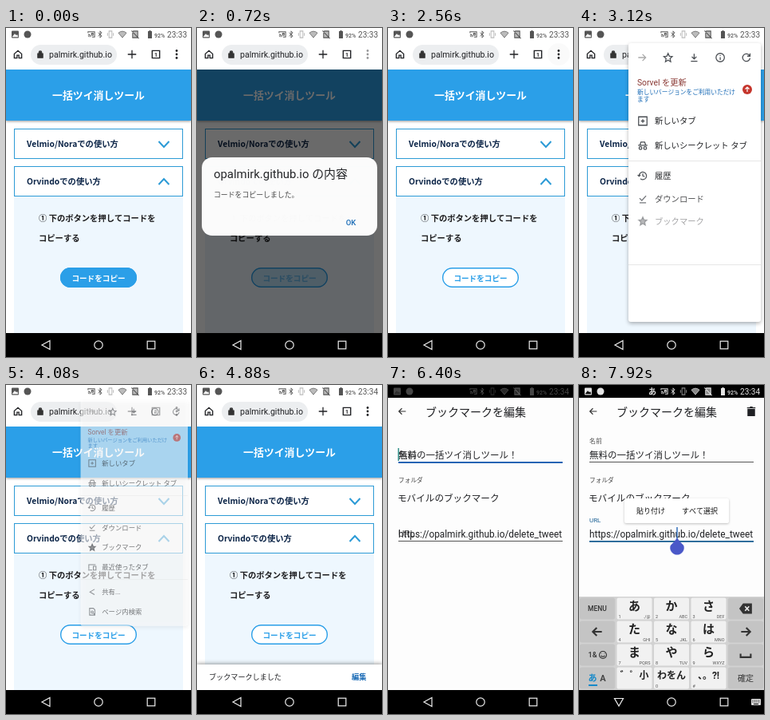
Animation of 232x412 px, one loop 8000 ms. Source, as an HTML page with a canvas:

```html
<!DOCTYPE html>
<html lang="ja">
<head>
<meta charset="utf-8">
<title>ブックマークの登録</title>
<style>
html, body { margin: 0; width: 232px; height: 412px; overflow: hidden; background: #fff; }
canvas { display: block; }
</style>
</head>
<body>
<canvas id="stage" width="232" height="412"></canvas>
<script>
const g = document.getElementById('stage').getContext('2d');
const UI = "Roboto, 'Noto Sans CJK JP', 'Noto Sans CJK', sans-serif";
const JP = "'Noto Sans CJK JP', 'Noto Sans CJK', sans-serif";
const BLUE = '#2b9fe8', INK = '#202124', LINK = '#1769b5';
const LOOP = 8000, STEP = 80, BOTTOM = 382;

const ICON = {
  home: 'M4 11 12 4 20 11V20H14V14H10V20H4Z',
  lock: 'M5 10H19V21H5ZM8 10V7a4 4 0 0 1 8 0V10',
  plus: 'M12 3V21M3 12H21',
  tab: 'M4 4H20V20H4Z',
  back: 'M20 12H5M11 5 4 12 11 19',
  forward: 'M4 12H19M13 5 20 12 13 19',
  star: 'M12 3 14.7 9.2 21 9.8 16.2 14.2 17.6 21 12 17.5 6.4 21 7.8 14.2 3 9.8 9.3 9.2Z',
  download: 'M12 4V15M7 10 12 15 17 10M5 20H19',
  info: 'M21 12a9 9 0 1 1-18 0a9 9 0 1 1 18 0M12 11V17M12 7V8.5',
  reload: 'M19 8A8 8 0 1 0 20 13M20 3V9H14',
  add: 'M3 3H21V21H3ZM12 8V16M8 12H16',
  hat: 'M2 11H22M6 10 8 4H16L18 10M10 17a3 3 0 1 1-6 0a3 3 0 1 1 6 0M20 17a3 3 0 1 1-6 0a3 3 0 1 1 6 0',
  history: 'M4 12a8 8 0 1 1 3 6.3M1 10 4 13 7 10M12 7V12L16 14',
  done: 'M5 10 10 15 19 5M5 20H19',
  devices: 'M3 17V5H21M1 19H12M15 9H22V19H15Z',
  share: 'M18 5 6 12 18 19M19 5h.1M5 12h.1M19 19h.1',
  find: 'M5 3H15L19 7V21H5ZM15 13a3 3 0 1 1-6 0a3 3 0 1 1 6 0M14 15 18 19',
  trash: 'M5 8H19V21H5ZM3 4.5H21M9 3H15',
  cast: 'M3 8V5H21V19H14M3 12a7 7 0 0 1 7 7M3 16a3 3 0 0 1 3 3M13 9H17V14H13Z',
  bluetooth: 'M6 7 17 17 12 22V2L17 7 6 17',
  phone: 'M8 3H16V21H8ZM4 8V16M20 8V16',
  wifi: 'M1 8Q12-1 23 8L12 21Z',
  noSim: 'M7 3H19V21H5V8ZM2 2 22 23',
  erase: 'M8 4H22V20H8L2 12Z',
  cross: 'M11 8 18 16M18 8 11 16',
  space: 'M3 10V16H21V10',
  smile: 'M21 12a9 9 0 1 1-18 0a9 9 0 1 1 18 0M8 9V10M16 9V10M7 14Q12 19 17 14',
};

const clamp = v => Math.max(0, Math.min(1, v));
const ramp = (t, a, b) => clamp((t - a) / (b - a));
const ease = k => 1 - (1 - k) ** 3;

function text(s, x, y, size, color, weight = 400, align = 'left', font = UI) {
  g.font = `${weight} ${size}px ${font}`;
  g.textAlign = align;
  g.fillStyle = color;
  g.fillText(s, x, y + size * .37);
}
function rect(x, y, w, h, color) {
  g.fillStyle = color;
  g.fillRect(x, y, w, h);
}
function round(x, y, w, h, r, fill, stroke, width = 1) {
  g.beginPath();
  g.roundRect(x, y, w, h, r);
  if (fill) { g.fillStyle = fill; g.fill(); }
  if (stroke) { g.strokeStyle = stroke; g.lineWidth = width; g.stroke(); }
}
function dot(x, y, r, color) {
  g.fillStyle = color;
  g.beginPath();
  g.arc(x, y, r, 0, 7);
  g.fill();
}
function path(d, color, width, fill) {
  const p = new Path2D(d);
  if (fill) { g.fillStyle = fill; g.fill(p); }
  g.strokeStyle = color;
  g.lineWidth = width;
  g.stroke(p);
}
function icon(name, x, y, size, color, fill, width = 2.2) {
  g.save();
  g.translate(x, y);
  g.scale(size / 24, size / 24);
  g.translate(-12, -12);
  path(ICON[name], color, width, fill);
  g.restore();
}
function layer(alpha, draw, dx = 0, dy = 0, scale = 1) {
  if (alpha <= 0) return;
  g.save();
  g.globalAlpha *= alpha;
  g.translate(dx, dy);
  g.scale(scale, scale);
  draw();
  g.restore();
}
function shadow(blur, y, strength, draw) {
  g.save();
  g.shadowColor = `rgba(0,0,0,${strength})`;
  g.shadowBlur = blur;
  g.shadowOffsetY = y;
  draw();
  g.restore();
}

function statusIcons(t, color, faint, knockout) {
  round(7, 3.5, 9, 9, 1, color);
  path('M8 11 11 7.5 13 9.5 14 8.5 15 11Z', knockout, .5, knockout);
  dot(27, 8, 4.5, color);
  if (t >= 7600) text('あ', 92, 8, 10, color, 700, 'center');
  icon('cast', 107, 8, 11, color);
  icon('bluetooth', 118, 8, 10, color);
  icon('phone', 131, 8, 11, faint);
  icon('wifi', 146, 8, 11, color, faint, 1.5);
  icon('noSim', 162, 8, 11, color, faint);
  rect(178, 4, 5, 9, color);
  rect(179.5, 3, 2, 1, color);
  text('92%', 186, 9, 7, color, 500);
  text(t < 4880 ? '23:33' : '23:34', 227, 8, 10, color, 400, 'right');
}

function toolbar(t, dim) {
  rect(0, 0, 232, 52, '#fff');
  statusIcons(t, '#555', '#bbb', '#fff');
  icon('home', 15, 33, 14, INK);
  round(31, 21, 108, 25, 12.5, '#eceef0');
  icon('lock', 43, 33, 11, '#333', '#333');
  text('palmirk.github.io', 54, 33, 10.6, INK);
  icon('plus', 158, 33, 14, INK);
  icon('tab', 188, 33, 14, INK, null, 2.4);
  text('1', 188, 33, 7, INK, 700, 'center');
  const tap = ramp(t, 2540, 2700) * (1 - ramp(t, 2700, 2960));
  layer(tap * .15, () => dot(214, 33, 14, '#000'));
  layer(1 - dim * .55, () => [28.5, 33, 37.5].forEach(y => dot(214, y, 1.4, INK)));
}

function panel(y, h, label, up) {
  rect(10, y, 212, h, '#fff');
  g.strokeStyle = '#2d9bd6';
  g.lineWidth = 1;
  g.strokeRect(10.5, y + .5, 211, h - 1);
  text(label, 26, y + 19, 10.3, '#0b2447', 700, 'left', JP);
  const c = y + 19.5, d = up ? -3.5 : 3.5;
  path(`M191.5 ${c - d}L198 ${c + d}L204.5 ${c - d}`, '#2d9bd6', 2);
}

function page(t) {
  rect(0, 52, 232, BOTTOM - 52, '#fff');
  shadow(3, 1, .4, () => rect(0, 52, 232, 64, BLUE));
  text('一括ツイ消しツール', 116, 84, 12.9, '#fff', 700, 'center', JP);
  rect(10, 211, 212, BOTTOM - 211, '#eef7fe');
  panel(126, 38, 'Velmio/Noraでの使い方', false);
  panel(173, 38, 'Orvindoでの使い方', true);
  text('① 下のボタンを押してコードを', 41, 238, 10.3, '#1d1d1f', 700, 'left', JP);
  text('コピーする', 41, 263, 10.3, '#1d1d1f', 700, 'left', JP);

  // The colour change pauses while the dialog blocks the page.
  const pressed = .7 * ramp(t, 160, 480) + .3 * ramp(t, 1360, 1680);
  const label = color => text('コードをコピー', 116, 313, 9.6, color, 700, 'center', JP);
  round(68.7, 300.7, 94.6, 23.6, 11.8, '#fff');
  layer(1 - pressed, () => round(68, 300, 96, 25, 12.5, BLUE));
  round(68.7, 300.7, 94.6, 23.6, 11.8, null, BLUE, 1.4);
  label(BLUE);
  layer(1 - pressed, () => label('#fff'));
}

function dialog(alpha) {
  layer(alpha * .6, () => rect(0, 52, 232, BOTTOM - 52, '#000'));
  layer(alpha, () => {
    round(6, 162, 220, 98, 13, '#fff');
    text('opalmirk.github.io の内容', 21, 182, 14.9, INK);
    text('コードをコピーしました。', 21, 209, 8.9, '#444');
    text('OK', 193, 243, 9.5, LINK, 500, 'center');
  });
}

const MENU = [
  ['add', '新しいタブ', 97.5], ['hat', '新しいシークレット タブ', 128.5],
  ['history', '履歴', 166.5], ['done', 'ダウンロード', 197],
  ['star', 'ブックマーク', 227.5], ['devices', '最近使ったタブ', 258.5],
  ['share', '共有...', 296.5], ['find', 'ページ内検索', 327],
];

// Menu coordinates start at its top right corner.
function menu(t) {
  const open = ease(ramp(t, 2700, 3000)), close = ramp(t, 4000, 4200);
  if (!open || close === 1) return;
  const grey = '#4b4f54';
  const row = (i, draw) => {
    const k = ease(ramp(t, 2800 + i * 48, 3000 + i * 48));
    layer(k, draw, 0, (k - 1) * 8);
  };
  layer(open * (1 - close), () => {
    shadow(5, 2, .3 * (1 - close) ** 2, () => round(-166, 0, 166, 349, 3, '#fff'));
    row(0, () => ['forward', 'star', 'download', 'info', 'reload']
      .forEach((name, i) => icon(name, -149 + i * 32.7, 18, 14, i ? grey : '#aaa')));
    row(1, () => {
      text('Sorvel を更新', -155, 49.5, 10.3, '#8a3a35');
      text('新しいバージョンをご利用いただけ', -155, 61, 7.7, LINK);
      text('ます', -155, 70, 7.7, LINK);
      dot(-17, 58, 6, '#c5352c');
      path('M-17 61V55M-19.5 57.5L-17 55L-14.5 57.5', '#fff', 1.2);
    });
    MENU.forEach(([name, label, y], i) => row(i + 2, () => {
      icon(name, -148, y, 14, grey, name === 'star' && grey);
      text(label, -133, y, 10.3, INK);
    }));
    rect(-166, 147, 166, .7, '#ddd');
    rect(-166, 277, 166, .7, '#ddd');
  }, 228, 19, (.8 + .2 * open) * (1 - .475 * close));
}

function snackbar(t) {
  const shown = ease(ramp(t, 4200, 4640)) * (1 - ramp(t, 5560, 5920));
  if (!shown) return;
  layer(1, () => {
    shadow(5, -1, .4, () => rect(0, 350, 232, 32, '#fff'));
    text('ブックマークしました', 15, 366, 9.1, INK);
    text('編集', 194, 366, 9.2, LINK, 700);
  }, 0, 33 * (1 - shown));
}

const KEYS = [
  ['MENU', 'あ|1|./@', 'か|2|ABC', 'さ|3|DEF', '*erase'],
  ['*back', 'た|4|GHI', 'な|5|JKL', 'は|6|MNO', '*forward'],
  ['1&', 'ま|7|PQRS', 'や|8|TUV', 'ら|9|WXYZ', '*space'],
  ['あA', '゛゜小||', 'わをん|0|', '、。?!|#|', '確定'],
];

function keyboard() {
  rect(0, 265, 232, BOTTOM - 265, '#d2d2d2');
  KEYS.forEach((line, r) => line.forEach((key, c) => {
    const x = 1 + c * 46.5, y = 266.5 + r * 29, mid = x + 22, cy = y + 13.5;
    const side = c % 4 === 0;
    round(x, y, 44, 27, 2, side ? '#c4c4c4' : '#f1f1f1');
    if (key === '*erase') {
      icon('erase', mid, cy, 17, '#333', '#333');
      icon('cross', mid, cy, 17, '#eee');
    } else if (key[0] === '*') {
      icon(key.slice(1), mid, cy, 17, '#333', null, 3);
    } else if (key === 'あA') {
      text('あ', mid - 6, cy, 11, '#1689c9', 700, 'center');
      text('A', mid + 7, cy, 11, '#444', 700, 'center');
      rect(mid - 11, cy + 8, 11, 2, '#1689c9');
    } else if (key === '1&') {
      text(key, mid - 6, cy, 9, '#333', 500, 'center');
      icon('smile', mid + 7, cy, 12, '#333');
    } else if (side) {
      text(key, mid, cy, key === 'MENU' ? 8.5 : 10, '#333', 500, 'center');
    } else {
      const [kana, num, hint] = key.split('|');
      text(kana, mid, cy - 3.5, kana.length > 1 ? 12 : 15, '#222', 700, 'center');
      text(num, x + 2, y + 23, 5.5, '#555');
      text(hint, x + 42, y + 23, 5.5, '#555', 400, 'right');
    }
  }));
}

function editor(t) {
  const float = ramp(t, 6400, 6560), onUrl = t >= 7600;
  const urlInk = '#1a5f93', label = 11.5 - 3.5 * float;
  rect(0, 0, 232, 16, '#000');
  layer(.3 + .7 * float, () => statusIcons(t, '#e4e4e4', '#888', '#000'));
  rect(0, 16, 232, BOTTOM - 16, '#fdfdfd');
  icon('back', 18, 33, 13, '#333');
  text('ブックマークを編集', 47, 33.5, 14, INK);
  layer(float, () => icon('trash', 216, 33, 14, INK, INK));

  text('名前', 13, 87.5 - 17 * float, label, '#555');
  text('無料の一括ツイ消しツール！', 13, 88, 11.5, INK);
  if (onUrl) rect(13, 96, 206, 1, '#555');
  else rect(13, 96, 206, 2, '#2464b4');
  if (t < 6880) rect(12.5, 79, 1.3, 16, '#16817a');

  text('フォルダ', 13, 119.5, 7.7, '#444');
  text('モバイルのブックマーク', 12, 142, 11.6, INK);

  text('URL', 13, 186 - 17 * float, label, onUrl ? urlInk : '#555');
  text('https://opalmirk.github.io/delete_tweet', 13, 187, 11.85, INK);
  if (t >= 7280) rect(13, 195, 206, 1.8, urlInk);
  else rect(13, 195, 206, 1, '#555');

  const k = ramp(t, 7680, 7920);
  layer(k, () => {
    rect(122.3, 178, 1.4, 16, '#2464b4');
    path('M123 192Q127 197 131 201A8.5 8.5 0 1 1 115 201Q119 197 123 192Z', '#4a58c8', .5, '#4a58c8');
    shadow(3, 1, .25, () => round(57, 142, 131, 31, 2, '#fff'));
    text('貼り付け', 72, 157.5, 9, '#111', 500);
    text('すべて選択', 129, 157.5, 9, '#111', 500);
  });
  if (k) layer(1, keyboard, 0, 117 * (1 - k));
}

function navBar(t) {
  const typing = t >= 7600;
  rect(0, BOTTOM, 232, 30, '#000');
  path(typing ? 'M44.5 392.5H55.5L50 402Z' : 'M55 391.5V402.5L45 397Z', '#eee', 1.2);
  g.beginPath();
  g.arc(116, 397, 5.2, 0, 7);
  g.stroke();
  g.strokeRect(177.2, 392.2, 9.6, 9.6);
  if (typing) {
    round(216, 393, 12, 8, 1, '#ddd');
    for (let i = 0; i < 8; i++) rect(217.5 + i % 4 * 2.5, 394.5 + (i >> 2) * 2, 1.2, 1, '#000');
    rect(219, 399, 6, 1, '#000');
  }
}

function frame(now) {
  const t = Math.floor(now % LOOP / STEP) * STEP;
  const alert = ease(ramp(t, 520, 800)) * (1 - ramp(t, 1360, 1760));
  const enter = ease(ramp(t, 6160, 6400));
  g.clearRect(0, 0, 232, 412);
  if (enter < 1) {
    page(t);
    toolbar(t, alert);
    dialog(alert);
    menu(t);
    snackbar(t);
  }
  layer(enter, () => editor(t), 0, 24 * (1 - enter));
  navBar(t);
  requestAnimationFrame(frame);
}
requestAnimationFrame(frame);
</script>
</body>
</html>
```
